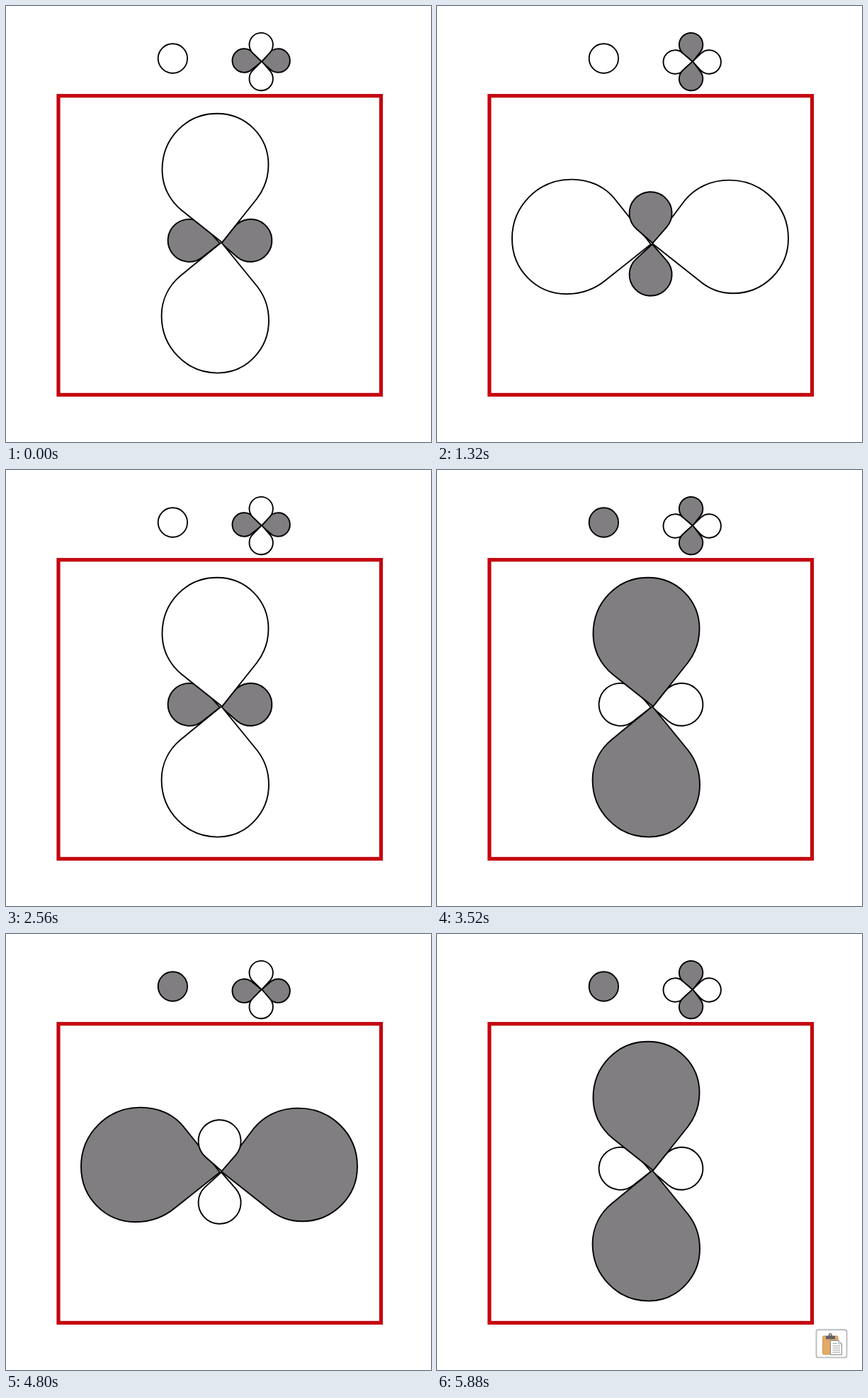
An HTML page for the animation above (6.92 s loop, 600 by 615 pixels).

```html
<!DOCTYPE html>
<html lang="en">
<head>
<meta charset="utf-8">
<title>Orbital phases</title>
<style>
  html, body { margin: 0; width: 100%; height: 100%; overflow: hidden; background: #fff; }
  svg { display: block; width: 100%; height: 100%; }
  .lobe { stroke: #000; stroke-width: 1.9; stroke-linejoin: round; }
</style>
</head>
<body>
<svg viewBox="0 0 600 615">
  <circle id="ball" class="lobe" cx="235.4" cy="74" r="20.7"/>
  <g id="icon"></g>
  <rect x="74" y="126.7" width="455.5" height="421.7" fill="none" stroke="#c4040f" stroke-width="5.2"/>
  <g id="main"></g>
  <g id="clip">
    <rect x="535.5" y="558.2" width="43" height="39.2" rx="3" fill="#fff" stroke="#bcbcbe" stroke-width="1.9"/>
    <rect x="544.5" y="567" width="21.5" height="26" rx="1.5" fill="#e2aa69" stroke="#cf9653"/>
    <path d="M549 571.5V567H552.5Q553 563 555.3 563T558.2 567H562V571.5Z" fill="#606062"/>
    <circle cx="555.4" cy="565.6" r="1" fill="#fff"/>
    <path d="M555.5 573.5H567L571.5 578V593.5H555.5Z" fill="#fff" stroke="#858587"/>
    <path d="M567 573.5V578H571.5M558.5 577.5H565M558.5 581H569M558.5 584H569M558.5 587H569M558.5 590H569" fill="none" stroke="#a0a0a4"/>
  </g>
</svg>
<script>
const LOOP = 6920;
const GREY = "#817e81", WHITE = "#fff";
const byId = id => document.getElementById(id);

// Teardrop: a circle joined to its apex by two tangents
function drop(cx, cy, r, ax, ay) {
  const a = Math.atan2(ay - cy, ax - cx);
  const b = Math.acos(r / Math.hypot(ax - cx, ay - cy));
  const at = t => `${(cx + r * Math.cos(t)).toFixed(2)} ${(cy + r * Math.sin(t)).toFixed(2)}`;
  return `M${ax} ${ay}L${at(a + b)}A${r} ${r} 0 1 1 ${at(a - b)}Z`;
}

const bigTall = [
  "M305 333.5L249 289C230 274 220.5 253 220.5 231C220.5 187 254 151.8 298 151.8C339 151.8 370.5 184 370.5 224C370.5 243 364 259 354 272Z",
  "M304 333.5L247 380C230 394 219.6 414 219.6 437C219.6 482 255 517.6 299 517.6C339 517.6 371 484 371 444C371 426 365 409 355 396Z"
];
const bigWide = [
  "M302 336L250 271C236 254 214 244.6 190 244.6C143 244.6 106 282 106 328C106 372 140 406.2 183 406.2C204 406.2 224 398.5 239 386Z",
  "M304 335L350 274C365 256 387 245.6 412 245.6C459 245.6 496 282 496 328C496 371 461 405.3 418 405.3C400 405.3 384 399 371 388Z"
];
const smallTall = [drop(301.6, 292.2, 30, 304.5, 334.5), drop(301.6, 378.8, 30, 304, 336)];
const smallWide = [drop(258.6, 330.8, 30, 302, 335), drop(345.4, 330.8, 30, 304, 335)];

const paint = (paths, fill) =>
  paths.map(d => `<path class="lobe" d="${d}" fill="${fill}"/>`).join("");

const tall = (big, small) => paint(smallWide, small) + paint(bigTall, big);
const wide = (big, small) => paint(bigWide, big) + paint(smallTall, small);

function clover(x, y, upright, across) {
  const r = 16.7;
  return paint([drop(336.2, y, r, 361, 78.5), drop(384.2, y, r, 360.5, 78.5)], across) +
    paint([drop(x, 54.6, r, 361, 78.5), drop(x, 102.6, r, 361, 78)], upright);
}

const cloverGrey = clover(358.6, 79, GREY, WHITE);
const tallWhite = { ball: WHITE, icon: clover(360.2, 77, WHITE, GREY), main: tall(WHITE, GREY) };
const wideWhite = { ball: WHITE, icon: cloverGrey, main: wide(WHITE, GREY) };
const tallGrey = { ball: GREY, icon: cloverGrey, main: tall(GREY, WHITE) };
const wideGrey = { ball: GREY, icon: clover(360.2, 80.2, WHITE, GREY), main: wide(GREY, WHITE) };

const scenes = [
  { start: 0, ...tallWhite },
  { start: 1200, ...wideWhite },
  { start: 2440, ...tallWhite },
  { start: 3520, ...tallGrey },
  { start: 4640, ...wideGrey },
  { start: 5800, ...tallGrey, clip: true }
];

let shown;
function draw(time) {
  const scene = scenes.findLast(s => time >= s.start);
  if (scene === shown) return;
  shown = scene;
  byId("ball").setAttribute("fill", scene.ball);
  byId("icon").innerHTML = scene.icon;
  byId("main").innerHTML = scene.main;
  byId("clip").setAttribute("visibility", scene.clip ? "visible" : "hidden");
}

const begin = performance.now();
function tick() {
  draw((performance.now() - begin) % LOOP);
  requestAnimationFrame(tick);
}
tick();
</script>
</body>
</html>
```
